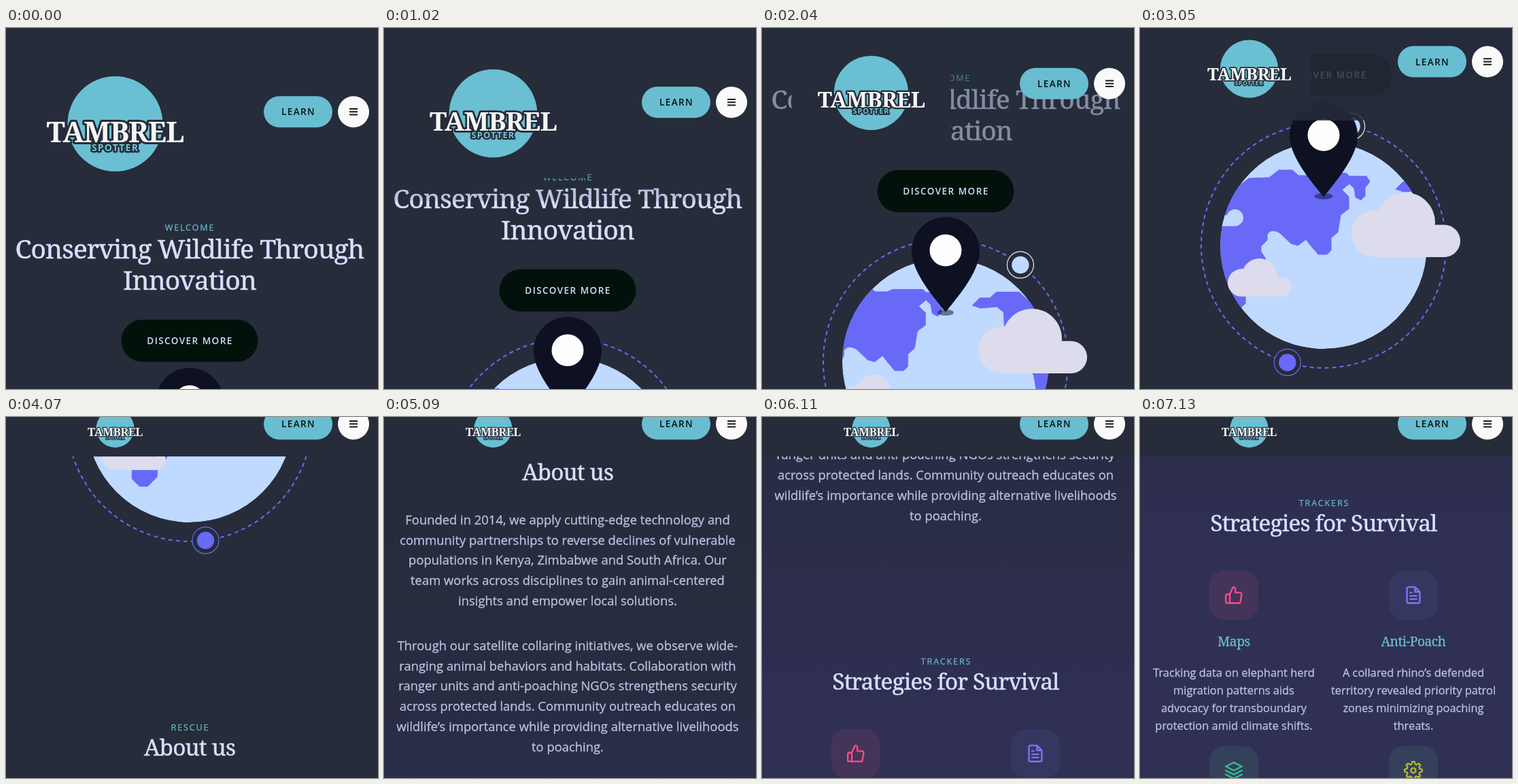
An HTML page for the animation above (7.15 s loop, 547 by 531 pixels).

```html
<!DOCTYPE html>
<html lang="en">
<head>
<meta charset="utf-8">
<title>Wildlife page</title>
<style>
html, body { margin: 0; width: 100%; height: 100%; overflow: hidden; background: #262c3a; }
svg { display: block; width: 100%; height: 100%; }
text { text-anchor: middle; font-family: "Open Sans", "Noto Sans", sans-serif; }
.title, .name, .mark { font-family: "Noto Serif", "DejaVu Serif", serif; letter-spacing: -.025em; }
.title { fill: #d6e0ff; stroke: #d6e0ff; stroke-width: .5px; }
.name { fill: #6cc0d2; stroke: #6cc0d2; stroke-width: .25px; font-size: 19.2px; }
.label { fill: #67b9cb; stroke: #67b9cb; stroke-width: .25px; font-size: 12.5px; letter-spacing: 1.9px; }
.button { font-size: 13.5px; font-weight: 600; letter-spacing: 1.45px; }
.body { fill: #b9c2e1; stroke: #b9c2e1; stroke-width: .3px; font-size: 18.4px; }
.small { font-size: 16.4px; }
.icon { fill: none; stroke-width: 2; stroke-linecap: round; stroke-linejoin: round; }
.brand text { stroke: #262c3a; paint-order: stroke; stroke-linejoin: round; font-weight: 700; }
</style>
</head>
<body>
<svg viewBox="0 0 547 531" preserveAspectRatio="none">
  <defs>
    <linearGradient id="sky" gradientUnits="userSpaceOnUse" x1="0" y1="0" x2="0" y2="2300">
      <stop offset=".5" stop-color="#262c3a"/>
      <stop offset=".65" stop-color="#282c41"/>
      <stop offset=".757" stop-color="#2d2e4d"/>
      <stop offset=".83" stop-color="#2f3054"/>
    </linearGradient>
    <clipPath id="disc"><circle cx="270" cy="711" r="152"/></clipPath>
    <g id="cloud" fill="#dcdcec">
      <circle cx="34.5" cy="60.5" r="34.5"/>
      <circle cx="79" cy="44" r="44"/>
      <path d="M34.500 26H79V47.500H136.250A23.750 23.750 0 0 1 136.250 95H34.500Z"/>
    </g>
  </defs>

  <g id="page">
    <rect width="547" height="2300" fill="url(#sky)"/>
    <g id="copy"></g>

    <circle cx="270" cy="711" r="180" fill="none" stroke="#6a6af6" stroke-width="2" stroke-dasharray="6 5"/>
    <g clip-path="url(#disc)">
      <circle cx="270" cy="711" r="152" fill="#bfd9ff"/>
      <g id="land" fill="#6969f8" stroke="#6969f8" stroke-linejoin="round"></g>
    </g>
    <g id="moons"></g>
    <use id="bigCloud" href="#cloud"/>
    <use id="smallCloud" href="#cloud"/>
    <ellipse id="shade" cx="270" cy="638.5" ry="4.6" fill="#0c1022" opacity=".5"/>
    <g id="pin">
      <path d="M0 90C-14 72 -50 32 -50 0A50 50 0 0 1 50 0C50 32 14 72 0 90Z" fill="#0d1122"/>
      <circle cy="-1" r="23.5" fill="#fdfdfe"/>
    </g>
  </g>

  <rect id="bar" width="547" fill="#262c3a"/>
  <g id="brand" class="brand">
    <rect x="-150" y="-124" width="300" height="248" fill="#262c3a"/>
    <circle cy="21" r="70" fill="#6abfd2"/>
    <text class="mark" y="48" font-size="42" fill="#f5f5f5" stroke-width="6">TAMBREL</text>
    <text y="60.5" font-size="14" letter-spacing="1.2" fill="#6fc4d6" stroke-width="5">SPOTTER</text>
  </g>
  <g id="menu">
    <rect x="379" y="100.200" width="101" height="46" rx="23" fill="#69bdd1"/>
    <text class="button" x="430" y="128.2" fill="#07120d">LEARN</text>
    <circle cx="511" cy="123.200" r="23" fill="#fafafa"/>
    <path d="M505 119h12M505 123.200h12M505 127.400h12" stroke="#16181c" stroke-width="2"/>
  </g>
</svg>

<script>
const LOOP = 7150;
const MID = 270;
const CARDS = 1686;

// start time, scroll position, pin drop
const steps = [
  [0, 0, 2], [1020, 74, 1], [2040, 220, 0], [3050, 391, 1.5],
  [4070, 708, 1], [5090, 1113, 1], [6110, 1453, 1], [7130, CARDS, 1]
];

const $ = id => document.getElementById(id);

function add(parent, tag, attrs, text) {
  const el = document.createElementNS("http://www.w3.org/2000/svg", tag);
  for (const key in attrs) el.setAttribute(key, attrs[key]);
  if (text) el.textContent = text;
  return parent.appendChild(el);
}

const copy = $("copy");

function lines(list, cls, x, y, gap, size) {
  list.forEach((line, i) => {
    const el = add(copy, "text", { class: cls, x, y: y + i * gap }, line);
    if (size) el.style.fontSize = size + "px";
  });
}

function heading(label, title, y) {
  lines([label], "label", MID + 1, y, 0);
  lines([title], "title", MID, y + 36.5, 0, 33.3);
}

// Hero and about text
lines(["WELCOME"], "label", MID + .5, 297.5, 0);
lines(["Conserving Wildlife Through", "Innovation"], "title", MID, 339.3, 45.5, 39);
add(copy, "rect", { x: 169.5, y: 429, width: 201, height: 62, rx: 31, fill: "#02120b" });
add(copy, "text", { class: "button", x: MID + .5, y: 465, fill: "#d3deff" }, "DISCOVER MORE");

heading("RESCUE", "About us", 1169);
lines([
  "Founded in 2014, we apply cutting-edge technology and",
  "community partnerships to reverse declines of vulnerable",
  "populations in Kenya, Zimbabwe and South Africa. Our",
  "team works across disciplines to gain animal-centered",
  "insights and empower local solutions."
], "body", MID, 1271, 29.7);
lines([
  "Through our satellite collaring initiatives, we observe wide-",
  "ranging animal behaviors and habitats. Collaboration with",
  "ranger units and anti-poaching NGOs strengthens security",
  "across protected lands. Community outreach educates on",
  "wildlife’s importance while providing alternative livelihoods",
  "to poaching."
], "body", MID, 1456, 29.7);

// Cards
function gear() {
  let d = "";
  for (let i = 0; i < 96; i++) {
    const a = i / 96 * Math.PI * 2;
    const r = 9.6 + 1.5 * Math.tanh(2 * Math.cos(8 * a));
    d += (i ? "L" : "M") + (12 + r * Math.cos(a)).toFixed(2) + " " + (12 + r * Math.sin(a)).toFixed(2);
  }
  return d + "ZM15 12a3 3 0 1 1-6 0a3 3 0 1 1 6 0Z";
}

function tile(x, y, back, color, d) {
  add(copy, "rect", { x: x - 36, y, width: 72, height: 72, rx: 22, fill: back });
  add(copy, "path", { class: "icon", d, stroke: color,
    transform: `translate(${x - 14.2} ${y + 21.8}) scale(1.18)` });
}

const [left, right] = [138, 402];
heading("TRACKERS", "Strategies for Survival", CARDS + 131);
tile(left, CARDS + 226, "#44345a", "#ff4a85",
  "M14 9V5a3 3 0 0 0-3-3l-4 9v11h11.300a2 2 0 0 0 2-1.700l1.400-9a2 2 0 0 0-2-2.300ZM7 22H4a2 2 0 0 1-2-2v-7a2 2 0 0 1 2-2h3");
tile(right, CARDS + 226, "#343861", "#8074f2",
  "M14 2H6a2 2 0 0 0-2 2v16a2 2 0 0 0 2 2h12a2 2 0 0 0 2-2V8ZM14 2v6h6M16 13H8M16 17H8M10 9H8");
tile(left, CARDS + 484, "#33415b", "#2fc08c",
  "M12 2 2 7l10 5 10-5ZM2 17l10 5 10-5M2 12l10 5 10-5");
tile(right, CARDS + 484, "#35415b", "#b6b92f", gear());
lines(["Maps"], "name", left, CARDS + 337, 0);
lines(["Anti-Poach"], "name", right, CARDS + 337, 0);
lines([
  "Tracking data on elephant herd", "migration patterns aids",
  "advocacy for transboundary", "protection amid climate shifts."
], "body small", left, CARDS + 381.5, 26.3);
lines([
  "A collared rhino’s defended", "territory revealed priority patrol",
  "zones minimizing poaching", "threats."
], "body small", right, CARDS + 381.5, 26.3);

// Continents, placed as they stand at 3050 ms
const land = $("land");
add(land, "path", { d: `M60 629L142 629L150 620L160 612L190 611L204 600L224 600L233 608L251 608
  L259 604.500L303 604.500L308 609L333 609L338 617L331 626V638L325 644L317 640L315 627L308 620L297 629
  L307 639V657L295 666L291 691L281 700V718L275 724H262L251 711L244 702L232 711L222 708
  L205 692Q192 685 187 695V703L178 712V720L184 729L187 737L175 757L164 776L155 786V796
  L141 810H129L118 799V772L100 755L60 740Z` });
add(land, "path", { d: "M376 628L387 617H402L411 608.500H445L468 630L490 690V830L474 775L466 730L425 690L422 638L412 630L388 632Z" });
add(land, "path", { d: "M100 682V667H128A12 12 0 1 1 140 682Z", fill: "#bfd9ff", stroke: "#bfd9ff" });

function moon(fill, ring) {
  const g = add($("moons"), "g", {});
  add(g, "circle", { r: 19.5, fill: "#262c3a", stroke: ring, "stroke-width": 1.2 });
  add(g, "circle", { r: 12.7, fill });
  return g;
}
const moons = [[moon("#bfd9ff", "#e6edfb"), -76.8], [moon("#6969f8", "#6969f8"), 107.2]];

function move(el, x, y, scale = 1) {
  el.setAttribute("transform", `translate(${x} ${y}) scale(${scale})`);
}

function show([time, scroll, drop]) {
  const sec = (time - 3050) / 1000;
  const p = Math.min(1, scroll / 600);

  move($("page"), 0, -scroll);
  move(land, 66 * sec, 0);
  move($("bigCloud"), 311 - 7 * sec, 633);
  move($("smallCloud"), 129 + 11.5 * sec, 730, .59);
  move($("pin"), MID, 548 + drop);
  $("shade").setAttribute("rx", 12 + drop);
  for (const [el, start] of moons) {
    const a = (start - 24.2 * sec) * Math.PI / 180;
    move(el, MID + 180 * Math.cos(a), 711 + 180 * Math.sin(a));
  }

  // The header shrinks and turns solid as the page scrolls
  $("bar").setAttribute("height", 282 - 224 * p);
  $("bar").setAttribute("opacity", Math.min(1, scroll / 470));
  move($("brand"), 160.5, 120 - 111.5 * p, 1 - .6 * p);
  move($("menu"), 0, -113 * p);
}

const begin = performance.now();
let current;
function tick() {
  const t = (performance.now() - begin) % LOOP;
  const step = steps.findLast(s => s[0] <= t);
  if (step !== current) show(current = step);
  requestAnimationFrame(tick);
}
tick();
</script>
</body>
</html>
```
